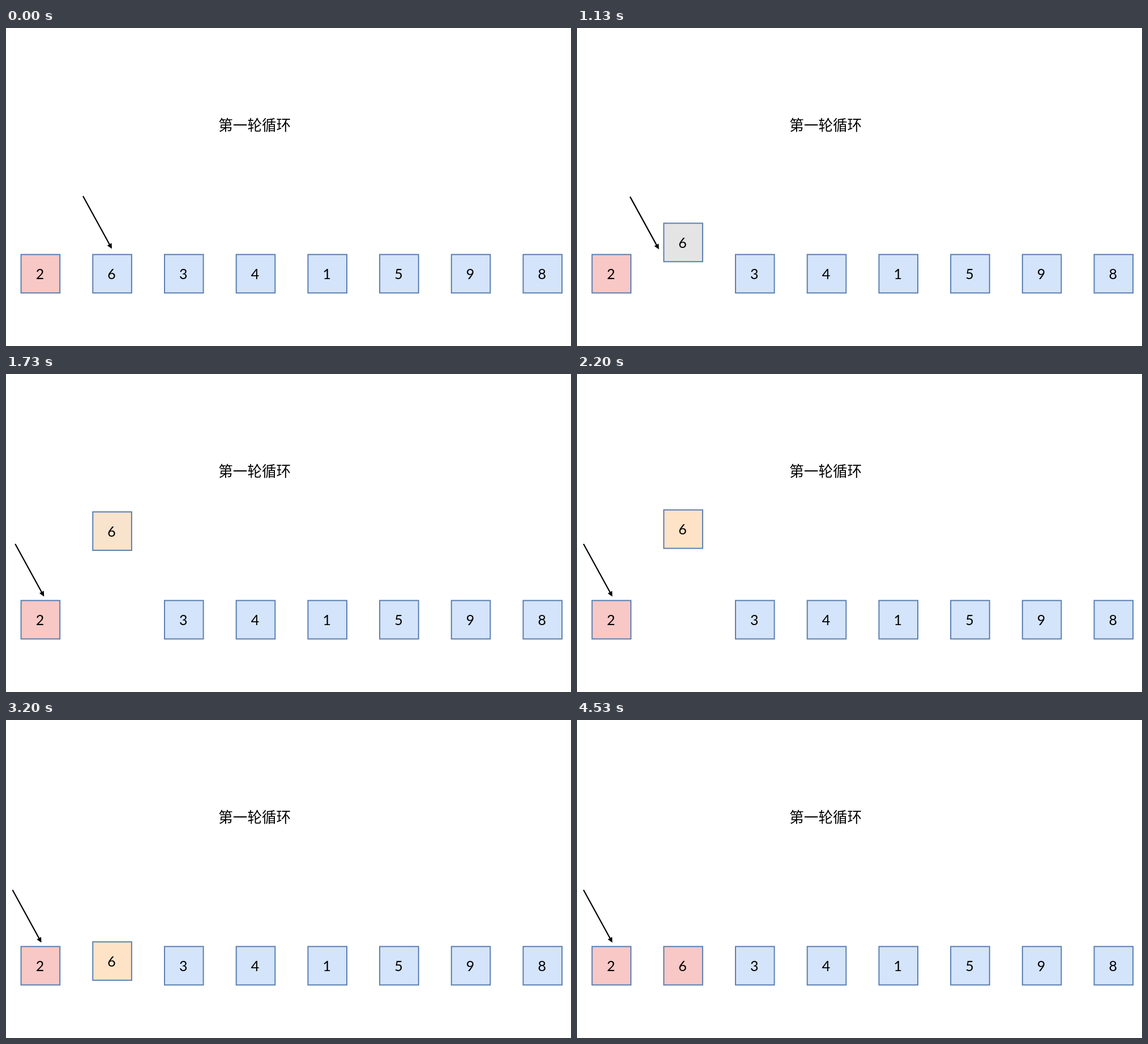
Write an HTML page that moves like this. It is 998x561 px and loops after 5200 ms.

```html
<!DOCTYPE html>
<html lang="zh">
<head>
<meta charset="utf-8">
<style>
  html, body { margin: 0; width: 100%; height: 100%; overflow: hidden; background: #fff; }
  svg { display: block; }
  rect { stroke: #5b7fb1; stroke-width: 2; }
  .digit { font: 25px Lato, sans-serif; text-anchor: middle; }
  .title { font: 25.6px "Noto Sans CJK SC", "Noto Sans CJK", sans-serif; }
</style>
</head>
<body>
<svg width="998" height="561" viewBox="0 0 998 561">
  <text class="title" x="375.2" y="181.2">第一轮循环</text>
  <g id="boxes"></g>
  <g id="arrow">
    <path d="M136 296.5L183.5 383" stroke="#000" stroke-width="2.2"/>
    <path d="M187 389.5L186.6 379.4L178.8 383.7Z"/>
  </g>
</svg>
<script>
const LOOP = 5200, FRAME = 1000 / 15, MOVE = 1333;
const BLUE = [212, 228, 250], ORANGE = [254, 227, 198], PINK = [247, 200, 198];
const LIFT = 162.5;

const rgb = c => `rgb(${c.map(Math.round)})`;
const mix = (a, b, u) => a.map((v, i) => v + (b[i] - v) * u);
const progress = (t, start, length) => Math.min(1, Math.max(0, (t - start) / length));
const ease = u => u < 0.5 ? 2 * u * u : 1 - 2 * (1 - u) ** 2;

const boxes = document.getElementById('boxes');
const arrow = document.getElementById('arrow');
boxes.innerHTML = [2, 6, 3, 4, 1, 5, 9, 8].map((n, i) => `
  <g transform="translate(${26.6 + 126.7 * i} 399.6)">
    <rect width="68.6" height="67.8" fill="${rgb(i ? BLUE : PINK)}"/>
    <text class="digit" x="33.3" y="43.7">${n}</text>
  </g>`).join('');
const active = boxes.children[1];
const activeRect = active.querySelector('rect');

function draw(now) {
  const t = Math.floor((now % LOOP + 4) / FRAME) * FRAME;
  const rise = progress(t, 584, MOVE);
  const fall = progress(t, 2079, MOVE);
  const settle = progress(t, 3500, 200);
  const up = ease(rise);

  active.setAttribute('transform', `translate(153.3 ${399.6 - LIFT * (up - ease(fall))})`);
  activeRect.setAttribute('fill', rgb(mix(mix(BLUE, ORANGE, rise), PINK, settle)));
  arrow.setAttribute('transform', `translate(${-124.5 * up} ${3.3 * up})`);
}

const begin = performance.now();
function tick() {
  draw(performance.now() - begin);
  requestAnimationFrame(tick);
}
tick();
</script>
</body>
</html>
```
